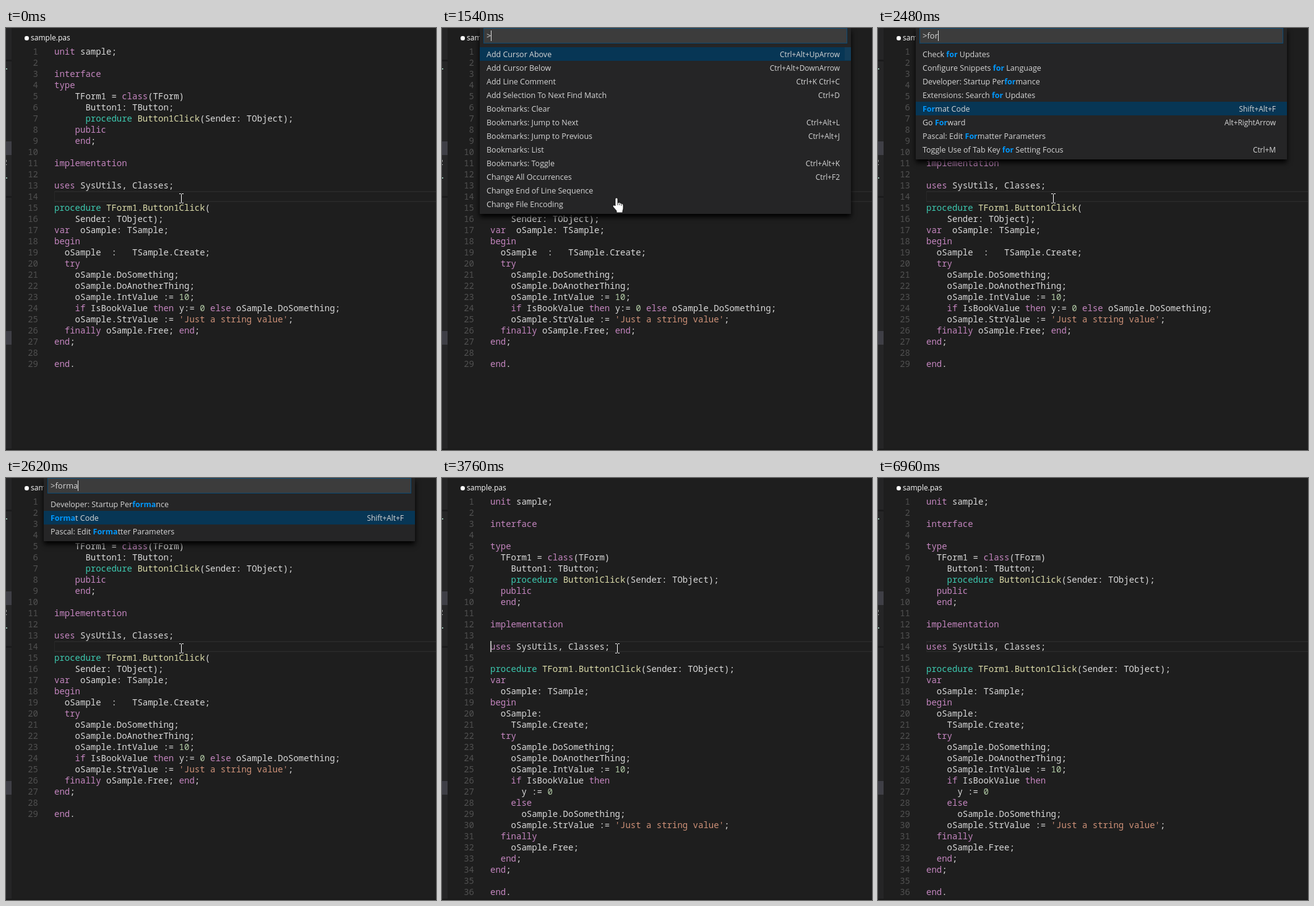
Recreate the animation shown at these times as an HTML page. Size 695 by 681 pixels, loop 7060 ms.

```html
<!DOCTYPE html>
<html lang="en">
<head>
<meta charset="utf-8">
<title>Formatting sample.pas</title>
<style>
html, body { margin: 0; width: 100%; height: 100%; overflow: hidden; background: #1e1e1e; }
#stage { position: relative; width: 695px; height: 681px; overflow: hidden; background: #1e1e1e; }
#stage > * { position: absolute; }
#side { left: 0; top: 0; }
#title { left: 40px; top: 7px; font: 12px/18px "Open Sans", sans-serif; color: #fff; }
#title::before { content: ""; position: absolute; left: -10px; top: 6px; width: 6.5px; height: 6.5px; border-radius: 50%; background: #fff; }
pre { margin: 0; top: 29px; font: 14px/18px "Noto Sans Mono", monospace; color: #dadada; }
#numbers { right: 643px; text-align: right; color: #505050; }
#code { left: 78px; }
.keyword { color: #c586c0; }
.proc { color: #3dc9b0; }
.func { color: #dcdcaa; }
.number { color: #b5cea8; }
.string { color: #ce9178; }
#line { left: 78px; top: 263px; width: 640px; height: 14px; border: 2px solid #282828; border-left-width: 1px; }
#caret { left: 78px; top: 263px; width: 2px; height: 18px; background: #aeafad; }
#bottom { left: 0; top: 679px; width: 695px; height: 2px; background: #191919; }
#palette { left: 61px; top: 0; width: 600px; padding: 31px 0 5px; background: #252526; box-shadow: 0 5px 8px #000;
  font: 12.5px/24px "Open Sans", sans-serif; color: #d6d6d6; white-space: pre; }
#input { position: absolute; left: 6px; top: 0; width: 582px; height: 23px; padding-left: 4px; font-size: 13px; line-height: 23px;
  background: #3c3c3c; border: 1px solid #0b4a73; }
#input i { display: inline-block; width: 1px; height: 17px; vertical-align: -4px; background: #ddd; }
.row { display: flex; justify-content: space-between; height: 22px; padding: 0 18px 0 11px; }
.row.selected { background: #073655; }
.row b { color: #0097fb; }
.row kbd { font: 11.9px/23px "Open Sans", sans-serif; }
#thumb { position: absolute; right: 0; width: 10px; background: rgba(121, 121, 121, .35); }
#mouse { width: 1px; height: 1px; overflow: visible; }
</style>
</head>
<body>
<div id="stage">
  <svg id="side" width="9" height="681">
    <path fill="#252526" d="M0 0h9v681H0z"/>
    <path fill="#1b1b1c" d="M0 51h9v3H0zM0 271h9v3H0z"/>
    <path fill="#3f3f46" d="M0 183h9v22H0zM0 489h9v22H0z"/>
    <path fill="#8fb8a8" d="M0 65h2v2H0zM0 241h2v2H0z"/>
    <text x="-5" y="221" font-family="Open Sans, sans-serif" font-size="12" fill="#ccc">2</text>
  </svg>
  <div id="title">sample.pas</div>
  <div id="line"></div>
  <pre id="numbers"></pre>
  <pre id="code"></pre>
  <div id="caret"></div>
  <div id="bottom"></div>
  <div id="palette"></div>
  <svg id="mouse">
    <path id="beam" fill="none" stroke="#fff" d="M-3-7.5h2.5l1 1 1-1h2.5M.5-6.5v13M-3 7.5h2.5l1-1 1 1h2.5"/>
    <g id="hand" stroke="#000" stroke-width=".8">
      <path fill="#fff" d="M-3 1q0-2 2-2t2 2v6q4-1 5 1q4 0 4 3v5q0 2-1 4v3h-10v-3l-6-7q0-3 3-2l1 1z"/>
      <path d="M1 7v4M4 8v3M7 9v3"/>
    </g>
  </svg>
</div>
<script>
const LOOP = 7060;
const FORMAT_TIME = 3760;
const THUMB_SHOWN_TIME = 1660;

const before = `unit sample;

interface
type
    TForm1 = class(TForm)
      Button1: TButton;
      procedure Button1Click(Sender: TObject);
    public
    end;

implementation

uses SysUtils, Classes;

procedure TForm1.Button1Click(
    Sender: TObject);
var  oSample: TSample;
begin
  oSample  :   TSample.Create;
  try
    oSample.DoSomething;
    oSample.DoAnotherThing;
    oSample.IntValue := 10;
    if IsBookValue then y:= 0 else oSample.DoSomething;
    oSample.StrValue := 'Just a string value';
  finally oSample.Free; end;
end;

end.`;

const after = `unit sample;

interface

type
  TForm1 = class(TForm)
    Button1: TButton;
    procedure Button1Click(Sender: TObject);
  public
  end;

implementation

uses SysUtils, Classes;

procedure TForm1.Button1Click(Sender: TObject);
var
  oSample: TSample;
begin
  oSample:
    TSample.Create;
  try
    oSample.DoSomething;
    oSample.DoAnotherThing;
    oSample.IntValue := 10;
    if IsBookValue then
      y := 0
    else
      oSample.DoSomething;
    oSample.StrValue := 'Just a string value';
  finally
    oSample.Free;
  end;
end;

end.`;

const formatCode = 'Format Code|Shift+Alt+F';
const goForward = 'Go Forward|Alt+RightArrow';
const editParams = 'Pascal: Edit Formatter Parameters';
const tabFocus = 'Toggle Use of Tab Key for Setting Focus|Ctrl+M';
const startup = 'Developer: Startup Performance';

// Palette contents for each typed query; thumb is [top, height].
const results = {
  '': { selected: 0, thumb: [31, 21], rows: [
    'Add Cursor Above|Ctrl+Alt+UpArrow', 'Add Cursor Below|Ctrl+Alt+DownArrow',
    'Add Line Comment|Ctrl+K Ctrl+C', 'Add Selection To Next Find Match|Ctrl+D',
    'Bookmarks: Clear', 'Bookmarks: Jump to Next|Ctrl+Alt+L',
    'Bookmarks: Jump to Previous|Ctrl+Alt+J', 'Bookmarks: List',
    'Bookmarks: Toggle|Ctrl+Alt+K', 'Change All Occurrences|Ctrl+F2',
    'Change End of Line Sequence', 'Change File Encoding'] },
  fo: { selected: 0, thumb: [153, 112], rows: [
    'Fold|Ctrl+Shift+[', 'Fold All|Ctrl+Shift+Alt+[', formatCode, goForward,
    'GPM: Refresh specific project folder', editParams, tabFocus,
    'Unfold|Ctrl+Shift+]', 'Unfold All|Ctrl+Shift+Alt+]',
    'View: Focus into Left Hand Editor|Ctrl+1',
    'View: Focus into Next Editor on the Left|Ctrl+Alt+LeftArrow',
    'View: Focus into Next Editor on the Right|Ctrl+Alt+RightArrow'] },
  for: { selected: 4, rows: [
    'Check for Updates', 'Configure Snippets for Language', startup,
    'Extensions: Search for Updates', formatCode, goForward, editParams, tabFocus] },
  forma: { selected: 1, rows: [startup, formatCode, editParams] },
  format: { selected: 0, rows: [formatCode, editParams] },
};

const queries = [[0, null], [1540, ''], [2350, 'fo'], [2480, 'for'], [2620, 'forma'], [2750, 'format'], [3620, null]];
const caretToggles = [270, 680, 1240, 2200, 2350, 3180, 3620, 4040, 4620, 5050, 5580, 6000, 6530, 6960];
const mousePath = [[0, 283, 275], [5050, 330, 313], [5180, 375, 352], [5330, 400, 374],
  [5580, 458, 447], [5730, 552, 571], [6000, 616, 634], [6130, -99, -99]];

const $ = id => document.getElementById(id);
const stepAt = (steps, t) => steps.filter(step => step[0] <= t).pop();
const show = (id, visible) => { $(id).style.visibility = visible ? 'visible' : 'hidden'; };

const syntax = new RegExp([
  "(?<string>'.*?')", '(?<number>\\b\\d+\\b)', '(?<proc>\\bprocedure\\b)', '(?<func>(?:TForm1\\.)?Button1Click)',
  '(?<keyword>\\b(?:unit|interface|type|class|public|end|implementation|uses|var|begin|try|if|then|else|finally)\\b)',
].join('|'), 'g');

function highlight(source) {
  return source.replace(syntax, (text, ...rest) => {
    const groups = rest.pop();
    const kind = Object.keys(groups).find(name => groups[name]);
    return `<span class="${kind}">${text}</span>`;
  });
}

function drawCode(source) {
  $('code').innerHTML = highlight(source);
  $('numbers').textContent = source.split('\n').map((_, i) => i + 1).join('\n');
}

function drawPalette(query) {
  show('palette', query !== null);
  if (query === null) return $('palette').replaceChildren();
  const { rows, selected, thumb } = results[query];
  const list = rows.map((row, i) => {
    const [label, keys = ''] = row.split('|');
    const marked = query ? label.replace(new RegExp(query, 'i'), '<b>$&</b>') : label;
    return `<div class="row${i === selected ? ' selected' : ''}"><span>${marked}</span><kbd>${keys}</kbd></div>`;
  });
  const bar = thumb ? `<div id="thumb" style="top:${thumb[0]}px;height:${thumb[1]}px"></div>` : '';
  $('palette').innerHTML = `<div id="input">&gt;${query}<i id="inputCaret"></i></div>${list.join('')}${bar}`;
}

let shownSource, shownQuery;

function frame() {
  const t = performance.now() % LOOP;
  const source = t < FORMAT_TIME ? before : after;
  const query = stepAt(queries, t)[1];
  if (source !== shownSource) drawCode(shownSource = source);
  if (query !== shownQuery) drawPalette(shownQuery = query);

  const caretOn = caretToggles.filter(time => time <= t).length % 2 === 1;
  const open = query !== null;
  show('caret', caretOn && !open);
  if (open) show('inputCaret', caretOn);
  if ($('thumb')) $('thumb').style.opacity = t < THUMB_SHOWN_TIME ? 0.3 : 1;

  const [, x, y] = stepAt(mousePath, t);
  $('mouse').style.left = x + 'px';
  $('mouse').style.top = y + 'px';
  const overList = open && results[query].rows.length > 10;
  show('hand', overList);
  show('beam', !overList);
  requestAnimationFrame(frame);
}
frame();
</script>
</body>
</html>
```
